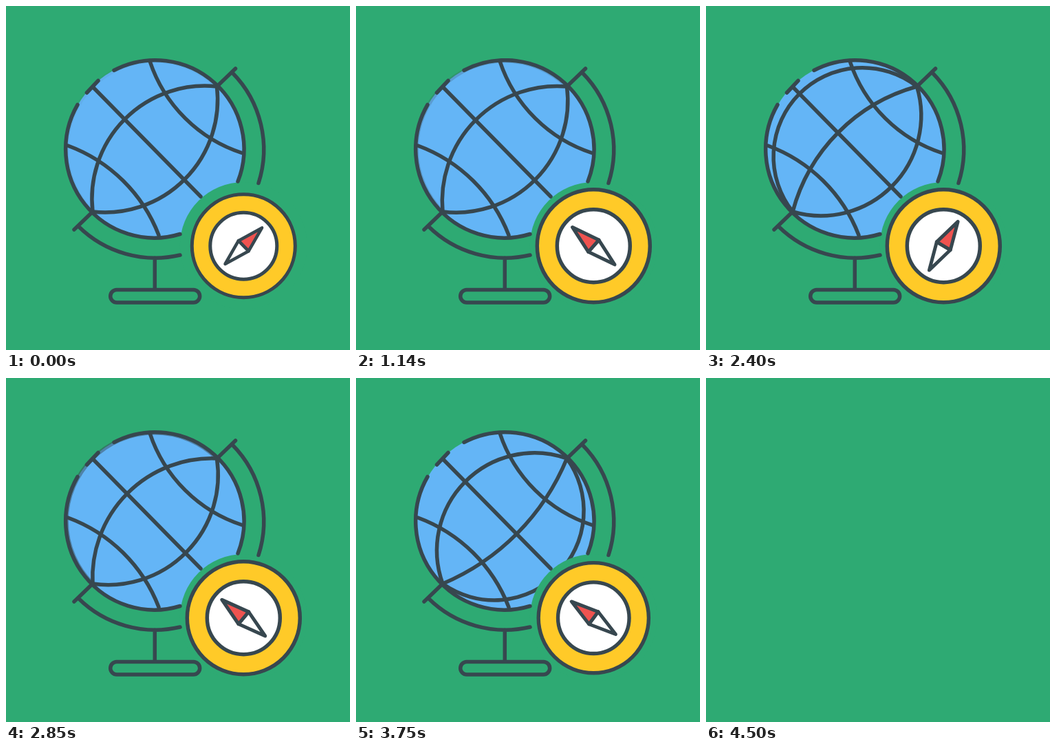
Recreate the animation shown at these times as an HTML page. Size 500 by 500 pixels, loop 4.53 s.

```html
<!DOCTYPE html>
<html lang="en">
<head>
<meta charset="utf-8">
<title>Globe and compass</title>
<style>
  html, body { margin: 0; width: 100%; height: 100%; overflow: hidden; background: #2eaa73; }
  svg { display: block; width: 100%; height: 100%; }
  #art { fill: none; stroke: #37474f; stroke-width: 5.5; stroke-linecap: round; stroke-linejoin: round; }
</style>
</head>
<body>
<svg viewBox="0 0 500 500">
  <g id="art">
    <circle cx="216.5" cy="207.7" r="129" fill="#64b5f6" stroke="none"/>
    <g id="meridians"><path/><path/><path/></g>
    <circle cx="345.3" cy="348.5" r="92.5" fill="#2eaa73" stroke="none"/>

    <!-- latitudes and globe outline -->
    <path d="M209 80A210 210 0 0 0 344 214M90 203A225 225 0 0 1 222 333M126 117.5L283 277"/>
    <path d="M337 255A129 129 0 0 0 157 93.5M134 108.5L117.5 126M104 143.5A129 129 0 0 0 253 331.5"/>

    <!-- stand -->
    <path d="M306.5 117L333.5 91M329 97A159 159 0 0 1 367 257.5"/>
    <path d="M126 299L99 325M105 320A159 159 0 0 0 253 362M216.3 366V412"/>
    <rect x="151.7" y="412.5" width="130" height="18.5" rx="9.2"/>

    <g id="compass">
      <circle r="82" fill="#ffca28"/>
      <circle r="53" fill="#fff"/>
      <g id="needle" stroke-width="5">
        <path d="M-11.5 0L0 41L11.5 0Z" fill="#fff"/>
        <path d="M-11.5 0L0 -41L11.5 0Z" fill="#ef5350"/>
      </g>
    </g>
  </g>
</svg>
<script>
const LOOP = 4530, END = 4500, TURN = END / 8;
const art = document.getElementById('art');
const compass = document.getElementById('compass');
const needle = document.getElementById('needle');
const meridians = document.querySelectorAll('#meridians path');

// Bulge of each meridian at the start and end of one turn step
const BULGES = [127, 61.5, -61.5, -127];
// Needle swing: [time, degrees]
const SWING = [
  [0, 45.5], [650, 38], [1140, -48.4], [1290, -63], [1620, 25], [1830, 39.5], [2080, 45],
  [2400, 30.6], [2700, -15], [2990, -70], [3270, -28.7], [3400, -22], [3750, -53.4],
  [3850, -57], [4500, 45.5]
];

const smooth = x => {
  const u = Math.min(1, Math.max(0, x));
  return u * u * (3 - 2 * u);
};

function slope(i) {
  if (i === 0 || i === SWING.length - 1) return 0;
  const [[t0, a0], [t1, a1], [t2, a2]] = SWING.slice(i - 1, i + 2);
  const before = (a1 - a0) / (t1 - t0), after = (a2 - a1) / (t2 - t1);
  return before * after > 0 ? 2 * before * after / (before + after) : 0;
}

// Cubic curve through the swing points, level at each extreme
function needleAngle(t) {
  const i = Math.max(0, SWING.findIndex(p => p[0] > t) - 1);
  const [t0, a0] = SWING[i], [t1, a1] = SWING[i + 1];
  const d = t1 - t0, u = (t - t0) / d, v = 1 - u;
  return a0 + (a1 - a0) * smooth(u) + d * u * v * (v * slope(i) - u * slope(i + 1));
}

function meridianPath(bulge) {
  const half = 128, b = Math.max(0.1, Math.abs(bulge));
  const r = (half * half + b * b) / (2 * b);
  return `M306.5 117A${r} ${r} 0 0 ${bulge > 0 ? 0 : 1} 126 299`;
}

function draw(t) {
  art.style.display = t < END ? '' : 'none';
  if (t >= END) return;

  const u = t % TURN / TURN, k = (u + smooth(u)) / 2;
  meridians.forEach((m, i) => {
    m.setAttribute('d', meridianPath(BULGES[i] + (BULGES[i + 1] - BULGES[i]) * k));
  });
  meridians[0].setAttribute('opacity', Math.min(1, 0.05 + u * 6));

  const grow = smooth(t / 840) * (1 - smooth((t - 3360) / 1140));
  compass.setAttribute('transform', `translate(345.3 348.7) scale(${0.915 + 0.085 * grow})`);
  needle.setAttribute('transform', `rotate(${needleAngle(t)})`);
}

function frame() {
  draw(performance.now() % LOOP);
  requestAnimationFrame(frame);
}
frame();
</script>
</body>
</html>
```
